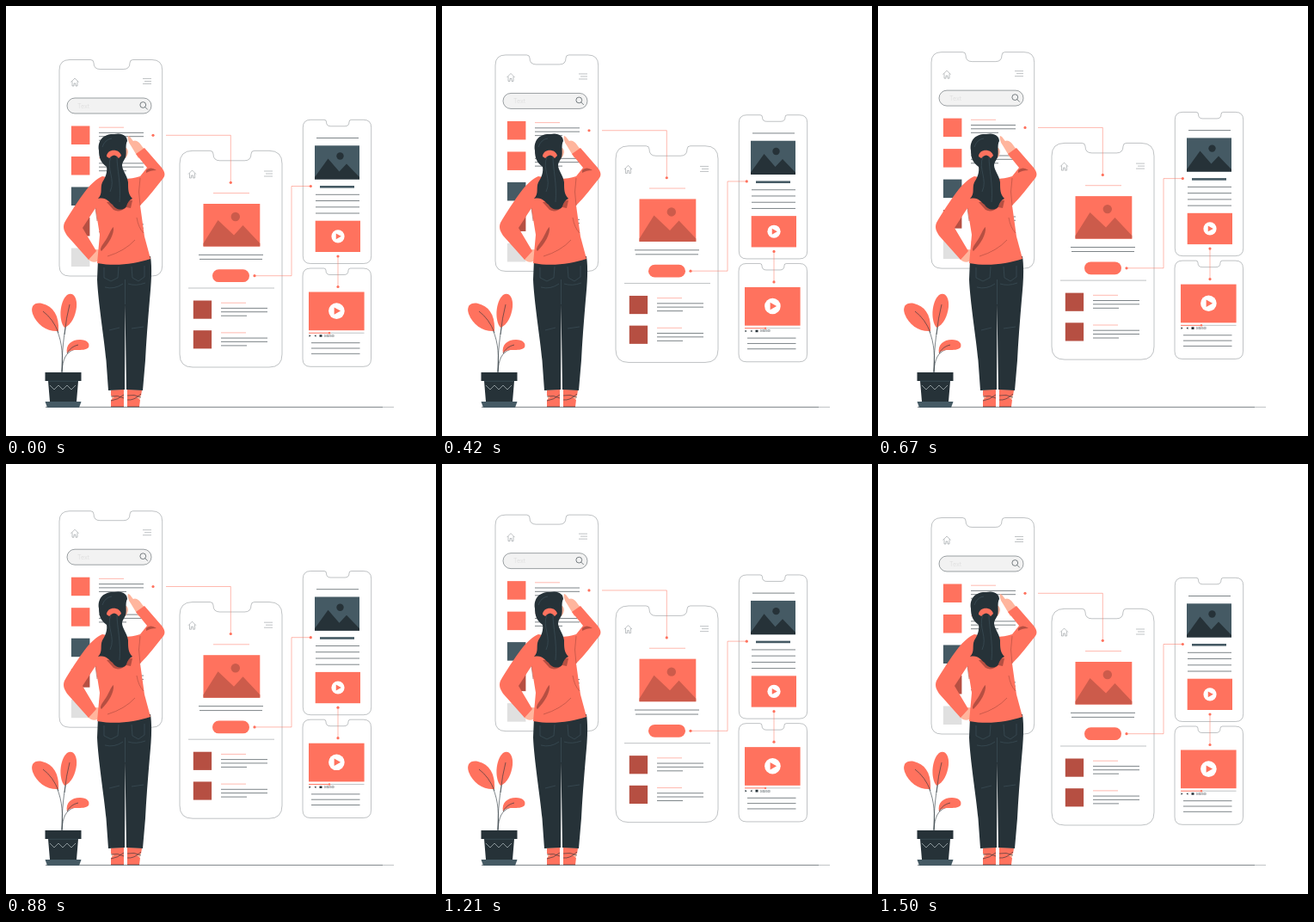
An HTML page for the animation above (1540 ms loop, 500 px wide and 500 px high).

```html
<!DOCTYPE html>
<html lang="en">
<head>
<meta charset="utf-8">
<title>App wireframes</title>
<style>
  html, body { margin: 0; width: 100%; height: 100%; overflow: hidden; background: #fff; }
  svg { display: block; width: 100vw; height: 100vh; }
  .coral { fill: #ff725e; }
  .deep { fill: #cc5b4b; }
  .brick { fill: #b64f42; }
  .ink { fill: #263238; }
  .slate { fill: #455a64; }
  .pale { fill: #e0e0e0; }
  .skin { fill: #ffb59d; }
  .line { fill: none; stroke: #263238; stroke-width: .6; }
  .thin { fill: none; stroke: #263238; stroke-width: .3; }
  .warm { fill: none; stroke: #ff725e; stroke-width: .5; }
  .soft { fill: none; stroke: #455a64; stroke-width: .5; }
</style>
</head>
<body>
<svg viewBox="0 0 500 500">
  <path class="line" d="M46 466.4H438"/>
  <path class="thin" d="M438 466.4H451"/>
  <g id="screens"></g>

  <g id="plant">
    <path class="line" d="M65 427C66 407 66 393 59 376M65 427C65 400 67 385 71 363M65 425C66 411 69 403 80 399"/>
    <path class="coral" d="M61 378C48 379 36 371 31 358C28 349 33 344 42 346C55 349 62 360 61 378Z"/>
    <path class="coral" d="M68 374C61 366 62 344 71 336C78 332 83 339 82 350C81 360 76 371 68 374Z"/>
    <path class="coral" d="M71 404C69 394 76 388 86 388C94 388 98 392 96 397C93 400 88 400 82 400C76 400 73 401 71 404Z"/>
    <path class="line" d="M43 355Q55 364 61 380M74 347Q70 362 68 382M71 404Q75 396 84 394"/>
    <path class="slate" d="M45.5 460H87.5L85 467H48Z"/>
    <path class="ink" d="M45.5 426H87.5V436H84L82 460H51L49 436H45.5Z"/>
    <path class="soft" d="M49 436.3H84"/>
    <path d="M51 441l5 5 5-5 5 5 5-5 5 5 5-5" fill="none" stroke="#cfd8dc" stroke-width=".6"/>
  </g>

  <g id="woman">
    <path class="skin" d="M123 446H136V457H123ZM141 446H157L156 457H141Z"/>
    <path class="coral" d="M122 447L137 446V466H122V458L126 455L122 453ZM141 446L158 447L157 453L152 455L156 458L155 466H141Z"/>
    <path class="line" d="M122 466H137M141 466H155M122 454Q130 452 137 456M122 459Q130 458 137 452M141 453Q149 451 157 455M141 458Q149 459 157 451"/>
    <path class="ink" d="M107 294L168 291C170 305 169 322 167 342C165 366 163 390 162 412L159 447L140 446L138.5 347L138 446L119 447L116.5 412C114 386 107 343 106 318Z"/>
    <path class="soft" d="M138.5 318V347M114 304V316L122 320L130 316L131 303M146 303L147 316L154 320L161 315V302M115 327Q126 330 136 323M142 323Q151 326 162 322M120 377L132 374M146 375L160 373"/>

    <path class="skin" d="M151 172L145 162C142 158 141 153 142 151C144 151 146 155 148 157C151 155 156 159 158 163L163 169L154 177Z"/>
    <path class="skin" d="M95 291L104 283C109 283 114 284 117 287L111 290L106 297C102 299 98 297 95 294Z"/>
    <path class="coral" d="M112 198C105 201 99 207 94 213C84 226 73 243 68 252C66 257 67 261 71 267L96 295L105 285L89 258L104 235L109 266L106 299C128 303 149 300 168 294L161 268L156 232C166 222 175 210 183 200C186 196 184 192 181 188L161 165L151 172L164 188L156 198Q139 204 112 198Z"/>
    <path class="brick" d="M163 191Q168 186 175 191Q168 191 163 194ZM125 257C126 265 120 276 111 285Q108 283 114 275C120 267 121 260 125 257ZM117 228L125 237Q132 241 140 234L145 235L147 226Z"/>
    <path class="line" style="stroke:#a94b3f" d="M104 235L106 250M156 200Q153 216 156 232M118 291Q138 285 150 272M152 246Q154 258 160 264"/>

    <path class="skin" d="M136 164Q142 164 142 170Q141 176 137 178Z"/>
    <path class="ink" d="M108 168C106 156 114 148 126 149C135 147 141 151 141 157C138 162 141 171 139 176C137 180 135 182 135 185C135 191 141 197 142 205C142 213 142 219 147 224Q142 226 140 233C136 239 127 237 124 231C118 227 117 222 107 224C113 218 109 212 112 205C116 199 118 193 117 187C110 182 108 176 108 168Z"/>
    <path class="coral" d="M117 175C117 166 132 165 134 174L131 177Q126 170 120 177Z"/>
    <path class="soft" d="M122 175C116 190 128 201 121 216M129 175C129 190 134 207 132 228M112 164Q115 155 123 154"/>
  </g>
</svg>
<script>
const path = (d, cls = 'line') => `<path class="${cls}" d="${d}"/>`;
const rule = (x1, x2, y, cls) => path(`M${x1} ${y}H${x2}`, cls);
const rect = (x, y, w, h, cls, r = 0) =>
  `<rect class="${cls}" x="${x}" y="${y}" width="${w}" height="${h}" rx="${r}"/>`;
const disc = (x, y, r, cls) => `<circle class="${cls}" cx="${x}" cy="${y}" r="${r}"/>`;
const dot = (x, y) => disc(x, y, 1.6, 'coral');

// Phone outline with a notch between n1 and n2
function phone(l, t, r, b, rad, n1, n2, depth) {
  const k = depth / 3;
  return path(`M${l} ${t + rad}Q${l} ${t} ${l + rad} ${t}H${n1 - k}Q${n1} ${t} ${n1} ${t + k}` +
    `Q${n1} ${t + depth} ${n1 + 2 * k} ${t + depth}H${n2 - 2 * k}Q${n2} ${t + depth} ${n2} ${t + k}` +
    `Q${n2} ${t} ${n2 + k} ${t}H${r - rad}Q${r} ${t} ${r} ${t + rad}V${b - rad}` +
    `Q${r} ${b} ${r - rad} ${b}H${l + rad}Q${l} ${b} ${l} ${b - rad}Z`, 'thin');
}
const home = (x, y) => path(`M${x - 4.5} ${y}l4.5 -4.5 4.5 4.5M${x - 3} ${y - 1}v5.5h2v-3h2v3h2v-5.5`, 'thin');
const menu = (x, y) => [0, 3, 6].map(d => rule(x + (d === 3 ? 2 : 0), x + 10, y + d, 'thin')).join('');
const play = (x, y, r) => `<circle cx="${x}" cy="${y}" r="${r}" fill="#fff"/>` +
  path(`M${x - r * .3} ${y - r * .45}L${x + r * .5} ${y}L${x - r * .3} ${y + r * .45}Z`, 'coral');
const copy = (x, y, long, short) => rule(x, x + 29, y, 'warm') +
  rule(x, x + long, y + 6.2) + rule(x, x + long, y + 10.5) + rule(x, x + short, y + 15);

const list = ['coral', 'coral', 'slate', 'brick', 'pale'].map((cls, i) => {
  const y = 139.5 + i * 35.5;
  return rect(75.9, y, 21.5, 21.5, cls) + copy(108, y + 1.7, 52, 32);
}).join('');

const first = phone(62, 62.5, 181.7, 314, 12, 102, 144, 11) + home(80, 88.5) + menu(159, 84.5) +
  '<rect x="71" y="107" width="98" height="18" rx="9" fill="#f2f2f2" stroke="#263238" stroke-width=".45"/>' +
  '<text x="83" y="118.5" font-family="Inter, sans-serif" font-size="7" fill="#e0e0e0">Text</text>' +
  '<circle class="line" cx="159.3" cy="115" r="3.4"/>' + path('M161.8 117.5l3 3') + list;

const second = phone(202, 168.3, 321, 420, 15, 241, 285, 11.5) + home(216.5, 195.5) + menu(300, 192) +
  rule(241, 283, 217.6, 'warm') +
  rect(229.5, 230, 65.8, 49.5, 'coral') + disc(266.8, 245, 5.2, 'deep') +
  path('M229.5 279.5V276L246.5 249L265 266.5L275.5 255L295.3 276V279.5Z', 'deep') +
  rule(224, 299, 289.4) + rule(225, 298, 294.4) +
  rect(240, 306.3, 43, 14.8, 'coral', 7.4) +
  rule(212, 312, 328, 'thin') +
  [342.5, 377.2].map(y => rect(217.8, y, 21.3, 21.2, 'brick') + copy(250, y + 2.7, 54, 30)).join('');

const third = phone(345.3, 132.3, 424.7, 299.5, 9, 372.5, 399, 7.5) + rule(361, 410, 153.5) +
  rect(359, 162.3, 52, 39.2, 'slate') + disc(388.5, 174.5, 4.2, 'ink') +
  path('M359 201.5V199L374.5 177.5L387.5 192.5L396 183.5L411 199V201.5Z', 'ink') +
  rect(365, 209, 40, 2.6, 'slate') +
  [219.3, 226.5, 233.8, 241].map(y => rule(360, 411, y)).join('') +
  rect(359.7, 249.7, 52.3, 36.3, 'coral') + play(386, 267.8, 7.6);

const fourth = phone(345, 305, 424.5, 419.3, 9, 372, 398, 7.5) +
  rect(352, 332.5, 64.6, 44.7, 'coral') + play(384.4, 354.6, 9.3) +
  rule(376, 416.5, 380.2, 'thin') + rect(352, 379.7, 24, 1, 'coral') + disc(376, 380.2, 1.2, 'coral') +
  path('M352.5 382.2v2.6l2 -1.3zM358.5 383.5l2 -1.3v2.6zM364.5 382.2h3v2.6h-3z', 'ink') +
  '<text x="370" y="384.9" font-family="Roboto, sans-serif" font-size="2.7" fill="#263238">0:00/0:00</text>' +
  [391.7, 398, 404.3].map(y => rule(355, 411.5, y)).join('');

const links = path('M186 150.3H261.3V205.3', 'warm') + dot(171, 150.3) + dot(261.3, 205.3) +
  path('M289 313.7H332V209.5H354', 'warm') + dot(289, 313.7) + dot(354.3, 209.5) +
  path('M386 291V326.5', 'warm') + dot(386, 291) + dot(386, 326.5);

const screens = document.getElementById('screens');
screens.innerHTML = first + second + third + fourth + links;

// Linear 10px float, 1.5 s up and down, stepped at 24 fps
const LOOP = 1540, STEPS = 37, FLOAT = 1.5, RISE = 10, LEAD = .02;
const lift = s => RISE * (1 - Math.abs(1 - 2 * ((s / FLOAT) % 1)));
const start = performance.now();

function draw() {
  const t = (performance.now() - start) % LOOP;
  const step = Math.floor((t + 3) / LOOP * STEPS) % STEPS;
  const y = lift(LEAD) - lift(step / 24 + LEAD);
  screens.setAttribute('transform', `translate(0 ${y.toFixed(2)})`);
  requestAnimationFrame(draw);
}
draw();
</script>
</body>
</html>
```
